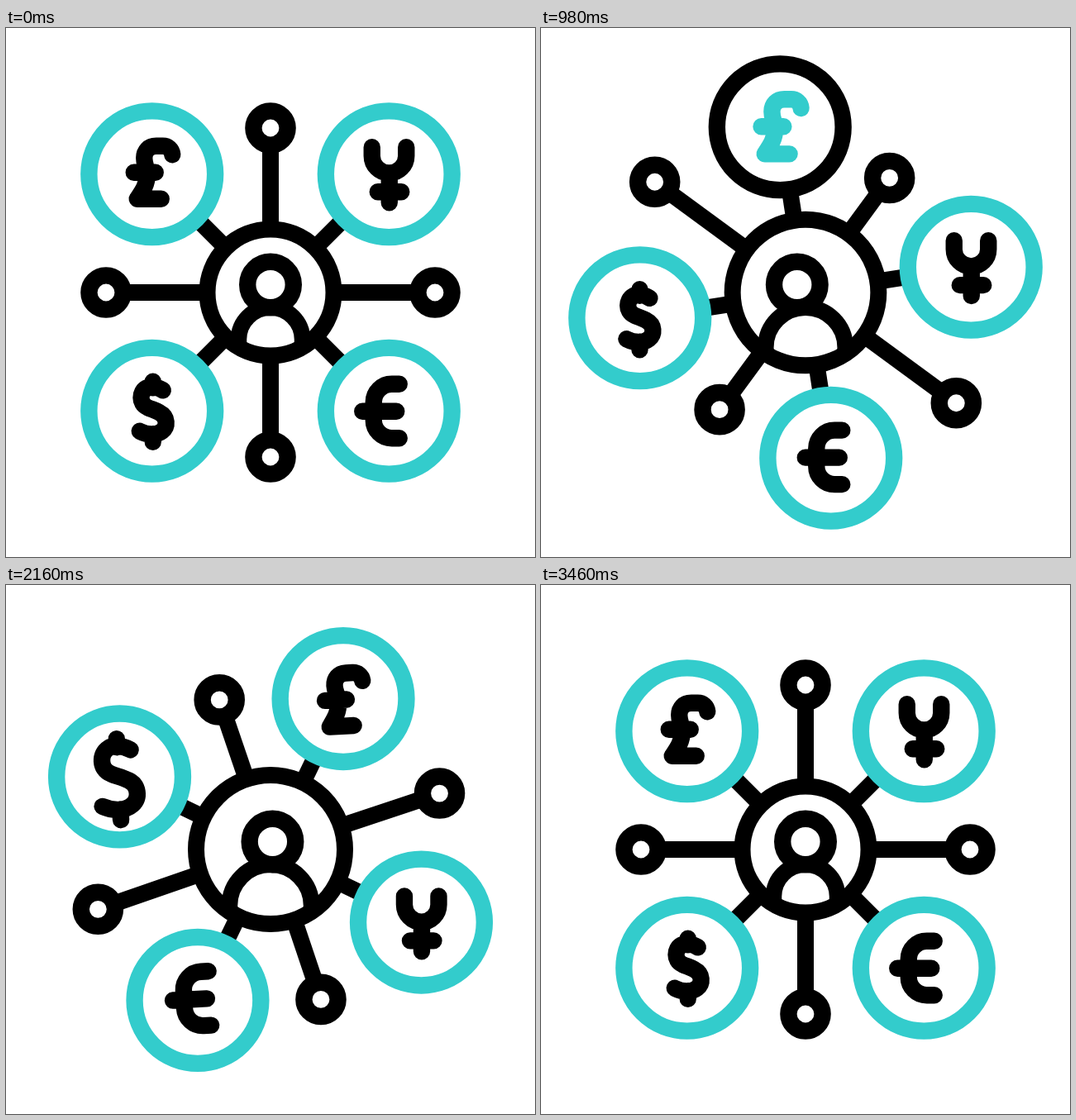
These frames come from a looping animation (640x640 px, 3600 ms). An HTML page with a canvas:

```html
<!DOCTYPE html>
<html lang="en">
<head>
<meta charset="utf-8">
<title>Currency network</title>
<style>
html, body { margin: 0; width: 100%; height: 100%; overflow: hidden; background: #fff; }
canvas { display: block; }
</style>
</head>
<body>
<canvas id="stage" width="640" height="640"></canvas>
<script>
const ctx = document.getElementById('stage').getContext('2d');
const LOOP = 3600, START = 200, TURN = 1800, END = 3460;
const BLACK = '#000', TEAL = '#33cccc';
const ORBIT = 202.6, DOT_REACH = 199, RING = 76.4;
const RAD = Math.PI / 180;

// angle: resting direction; delay: start of the pulse; drift: shift at full turn
const coins = [
  { angle: 225, delay: 0, drift: [0, 4], tilts: true,
    glyph: 'M24.5-23.5C24-30 19-34 13-34H5C-4-34-9.5-28-9.5-19.5C-9.5-11-6-8-6 1C-6 13-12 21-18 30H11M-22-2H4' },
  { angle: 315, delay: 800, drift: [0, 1], tilts: false,
    glyph: 'M-20.5-32.5V-22A20.7 20.7 0 0 0 21-22V-32.5M.5-1V34.5M-13.5 21.5H15' },
  { angle: 135, delay: 1600, drift: [-3.2, 2.5], tilts: true,
    glyph: 'M13-25C5-30-3-30-7-27.5C-15-23-16-9-6-4.5C-1-2 4-1 9 2C19 7 19 19 12 24.5C5 30-6 29-15 24.5M1-35.5V-28M1 37.5V28' },
  { angle: 45, delay: 2400, drift: [2.5, -2.7], tilts: true,
    glyph: 'M12.5-32.5H3.5A22 22 0 0 0-18.5-10.5V11A22 22 0 0 0 3.5 33H12.5M-32 .5H9' }
];
for (const c of coins) c.path = new Path2D(c.glyph);

// reach: change of length at the outer and inner swing; lead: degrees ahead of the coins
const dots = [
  { angle: 270, reach: [-28.5, 40], lead: 1.3 },
  { angle: 0, reach: [28.5, -26.5], lead: 1 },
  { angle: 90, reach: [-24.5, 46], lead: 0.2 },
  { angle: 180, reach: [28.5, -26.5], lead: 0.6 }
];

const smooth = u => u * u * (3 - 2 * u);

// Eased value through [time, value] keys
function track(t, ...keys) {
  if (t <= keys[0][0]) return keys[0][1];
  for (let i = 1; i < keys.length; i++) {
    const [t0, a] = keys[i - 1], [t1, b] = keys[i];
    if (t < t1) return a + (b - a) * smooth((t - t0) / (t1 - t0));
  }
  return keys[keys.length - 1][1];
}

// cubic-bezier(x1, 0, x2, 1)
function bezier(x, x1, x2) {
  if (x <= 0) return 0;
  if (x >= 1) return 1;
  let lo = 0, hi = 1;
  for (let i = 0; i < 24; i++) {
    const s = (lo + hi) / 2, r = 1 - s;
    if (3 * r * r * s * x1 + 3 * r * s * s * x2 + s * s * s < x) lo = s; else hi = s;
  }
  return smooth(lo);
}

const turnAt = t => t < TURN
  ? bezier((t - START) / (TURN - START), 0.333, 0.833)
  : bezier((END - t) / (END - TURN), 0.392, 0.825);

const polar = (deg, r) => [Math.cos(deg * RAD) * r, Math.sin(deg * RAD) * r];

function spoke([x, y]) {
  ctx.strokeStyle = BLACK;
  ctx.lineWidth = 20;
  ctx.lineCap = 'butt';
  ctx.beginPath();
  ctx.moveTo(0, 0);
  ctx.lineTo(x, y);
  ctx.stroke();
}

function ring(x, y, r, color, width = 20.4) {
  ctx.beginPath();
  ctx.arc(x, y, r, 0, 2 * Math.PI);
  ctx.fillStyle = '#fff';
  ctx.fill();
  ctx.strokeStyle = color;
  ctx.lineWidth = width;
  ctx.stroke();
}

function drawCoin(coin, [x, y], t, turn, tilt) {
  const local = t - START - coin.delay;
  const lit = local >= 430 && local < 840;
  const scale = track(local, [0, 1], [430, 1.37], [860, 1]);
  ring(x, y, RING, lit ? BLACK : TEAL);
  ctx.save();
  ctx.translate(x + coin.drift[0] * turn, y + coin.drift[1] * turn);
  if (coin.tilts) ctx.rotate(tilt * RAD);
  ctx.scale(scale, scale);
  ctx.lineWidth = 20.4 / scale;
  ctx.lineCap = ctx.lineJoin = 'round';
  ctx.strokeStyle = lit ? TEAL : BLACK;
  ctx.stroke(coin.path);
  ctx.restore();
}

function drawPerson(t) {
  const grow = track(t, [START, 0], [1200, 1], [2860, 1], [END, 0]);
  const headX = track(t, [START, 0], [1300, -12.8], [1600, -12.8], [2600, 13], [2850, 13], [END, 0]);
  const hub = 76.5 + 13.5 * grow;
  const body = 38.5 + 11 * grow;
  const foot = Math.sqrt(hub * hub - body * body);
  ring(0, 0, hub, BLACK, 20);
  ctx.lineWidth = 19.5;
  ctx.lineCap = 'butt';
  ctx.beginPath();
  ctx.moveTo(-body, foot);
  ctx.arc(0, 18.3 + body, body, Math.PI, 0);
  ctx.lineTo(body, foot);
  ctx.stroke();
  ring(headX, -9.5, 27.8, BLACK);
}

function draw(t) {
  const turn = turnAt(t), spin = 90 * turn;
  const tilt = track(t, [1700, 0], [2850, -8.7], [END, 0]);
  const ahead = track(t, [1100, 0], [2850, 1], [END, 0]);
  ctx.setTransform(1, 0, 0, 1, 0, 0);
  ctx.fillStyle = '#fff';
  ctx.fillRect(0, 0, 640, 640);
  ctx.translate(320, 320);

  const coinSpots = coins.map(c => polar(c.angle + spin, ORBIT));
  const dotSpots = dots.map(({ angle, reach, lead }) => polar(angle + spin + lead * ahead,
    DOT_REACH + track(t, [START, 0], [1100, reach[0]], [2850, reach[1]], [END, 0])));

  [...coinSpots, ...dotSpots].forEach(spoke);
  dotSpots.forEach(([x, y]) => ring(x, y, 20.6, BLACK));
  coins.forEach((c, i) => drawCoin(c, coinSpots[i], t, turn, tilt));
  drawPerson(t);
}

const begin = performance.now();
function frame(now) {
  draw(Math.max(0, now - begin) % LOOP);
  requestAnimationFrame(frame);
}
draw(0);
requestAnimationFrame(frame);
</script>
</body>
</html>
```
